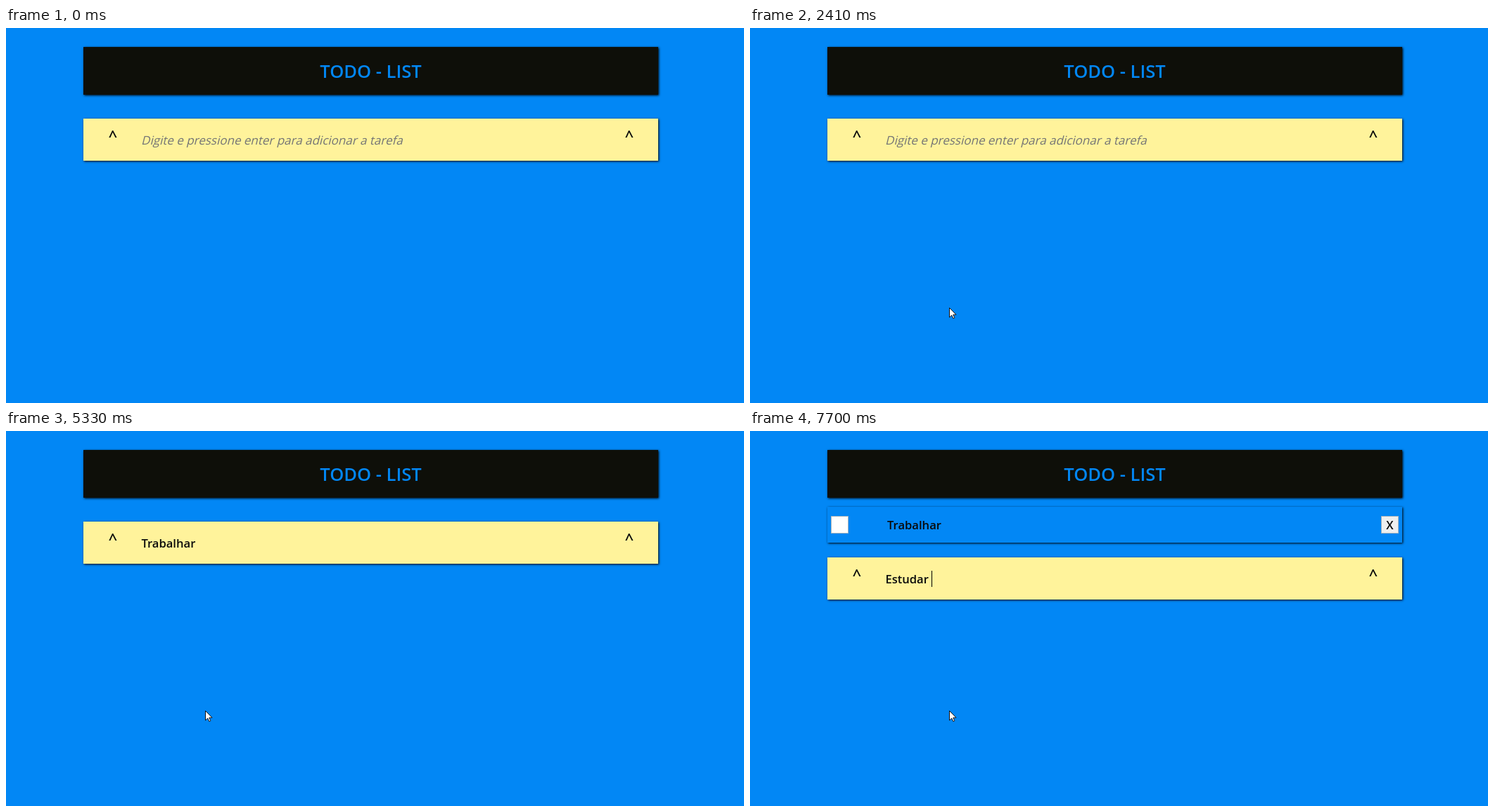
An HTML page for the animation above (8000 ms loop, 1049 by 534 pixels).

```html
<!DOCTYPE html>
<html lang="pt">
<head>
<meta charset="utf-8">
<title>Todo list</title>
<style>
  html, body { margin: 0; width: 100%; height: 100%; overflow: hidden; background: #0287f5; }
  .box { position: absolute; left: 110px; width: 817px; box-shadow: 1px 1px 3px #000; }
  #head { top: 27px; height: 68px; background: #0e0f09; }
  #item { top: 108px; height: 51px; }
  #field { top: 129px; height: 60px; background: #fff39b; }
  svg { position: absolute; left: 0; top: 0; }
  text { font: 600 16.6px "Open Sans", "Noto Sans", sans-serif; fill: #0a0a0a; white-space: pre; }
  .title { font-size: 25.5px; fill: #0287f5; }
  .mark { font-size: 22px; }
  .hint { font-size: 17px; font-weight: 400; fill: #757575; }
  .mid { text-anchor: middle; }
</style>
</head>
<body>
<div class="box" id="head"></div>
<div class="box" id="item"></div>
<div class="box" id="field"></div>
<svg width="1049" height="534" viewBox="0 0 1049 534">
  <text class="title mid" x="518.5" y="71">TODO - LIST</text>
  <g id="row">
    <rect x="115.5" y="121.5" width="24" height="24" fill="#fff" stroke="#a9b4bd"/>
    <text x="195" y="140">Trabalhar</text>
    <rect x="897.5" y="121.5" width="24" height="24" fill="#efefef" stroke="#a9b4bd"/>
    <text class="mid" x="909.5" y="140">X</text>
  </g>
  <g id="entry">
    <text class="mark mid" x="152" y="162">^</text>
    <text class="mark mid" x="886" y="162">^</text>
    <text class="hint" id="hint" transform="translate(192 166) skewX(-14)">Digite e pressione enter para adicionar a tarefa</text>
    <text id="typed" x="192.4" y="166"></text>
    <rect id="caret" y="148" width="1" height="23" fill="#000"/>
  </g>
  <g id="pointer">
    <path id="arrow" d="M.5 .5V14L3.7 11 5.8 15.6 7.8 14.7 5.8 10.2H10Z" fill="#fff" stroke="#111"/>
    <path id="beam" d="M0 .5H3L4 1.5 5 .5H8M4 1.5V12.5M0 13.5H3L4 12.5 5 13.5H8" fill="none" stroke="#111"/>
  </g>
</svg>
<script>
  const LOOP = 8000, STEP = 70, BLINK = 530;
  const FOCUS = 1880, ADDED = 5400, SHIFT = 51;
  const TEXT_X = 192.4, FIELD_END = 188;
  const el = id => document.getElementById(id);
  const show = (node, on) => { node.style.display = on ? '' : 'none'; };

  // bursts of typing: text, first key, time between keys
  const bursts = [
    ['Tra', 3140, 200], ['balhar', 3885, 183],
    ['Es', 6590, 130], ['tuda', 6980, 130], ['r ', 7570, 130]
  ];
  const keys = bursts.flatMap(([text, at, pace]) =>
    [...text].map((char, i) => ({ char, at: at + i * pace })));

  // pointer strokes: quadratic curves from a through b to c
  const strokes = [
    { from: 530, to: 1300, a: [205, 495], b: [204, 149], c: [223, 167] },
    { from: 1370, to: 1580, a: [223, 165], b: [224, 162], c: [224, 159] },
    { from: 1850, to: 2410, a: [224, 160], b: [470, 244], c: [283, 398] }
  ];

  function drawPointer(t) {
    const stroke = strokes.filter(s => s.from <= t).pop();
    show(el('pointer'), stroke);
    if (!stroke) return;
    const { from, to, a, b, c } = stroke;
    const u = Math.min(1, Math.floor((t - from) / STEP) * STEP / (to - from)), v = 1 - u;
    const [x, y] = [0, 1].map(i => Math.round(v * v * a[i] + 2 * u * v * b[i] + u * u * c[i]));
    const overField = y < FIELD_END;
    show(el('arrow'), !overField);
    show(el('beam'), overField);
    el('pointer').setAttribute('transform', `translate(${x} ${y})`);
  }

  function drawEntry(t, added) {
    const pressed = keys.filter(key => key.at <= t);
    const text = pressed.filter(key => !added || key.at >= ADDED).map(key => key.char).join('');
    el('typed').textContent = text;
    show(el('hint'), !text);

    // the caret blinks from the last key press or the focus
    const last = pressed.length ? pressed[pressed.length - 1].at : FOCUS;
    const lit = t >= FOCUS && Math.floor((t - last) / BLINK) % 2 === 0;
    const width = text ? el('typed').getComputedTextLength() : 0;
    show(el('caret'), lit);
    el('caret').setAttribute('x', Math.floor(TEXT_X + width));
  }

  function draw(t) {
    const added = t >= ADDED, dy = added ? SHIFT : 0;
    show(el('item'), added);
    show(el('row'), added);
    el('field').style.transform = `translateY(${dy}px)`;
    el('entry').setAttribute('transform', `translate(0 ${dy})`);
    drawEntry(t, added);
    drawPointer(t);
  }

  const begin = performance.now();
  function tick(now) {
    draw(Math.max(0, now - begin) % LOOP);
    requestAnimationFrame(tick);
  }
  draw(0);
  requestAnimationFrame(tick);
</script>
</body>
</html>
```
